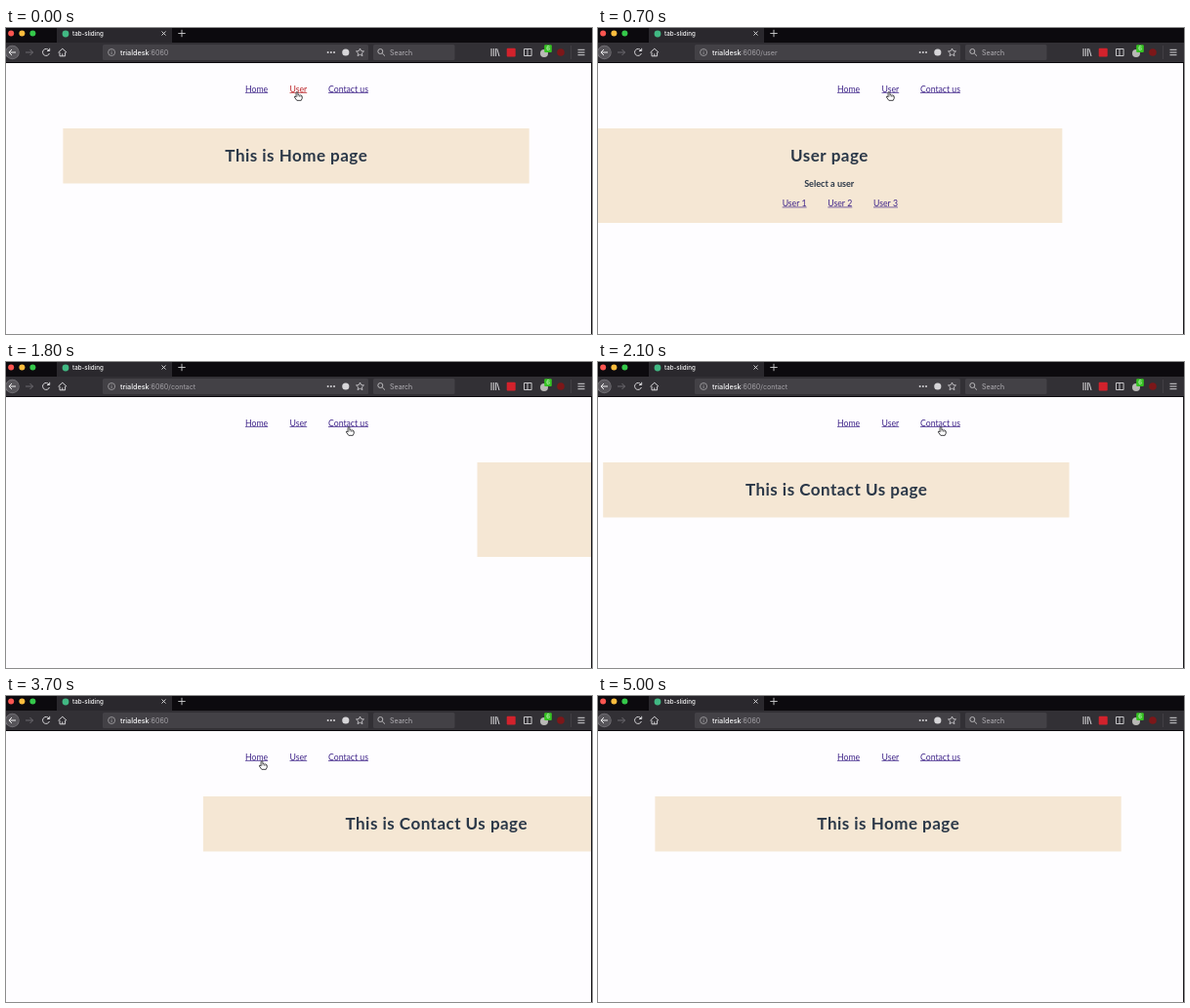
An HTML page with a canvas that plays this animation: 600x314 px, repeating every 5100 ms.

```html
<!DOCTYPE html>
<html lang="en">
<head>
<meta charset="utf-8">
<title>Page transitions</title>
<style>
html, body { margin: 0; width: 100%; height: 100%; overflow: hidden; background: #fefdff; }
canvas { display: block; width: 600px; height: 314px; }
</style>
</head>
<body>
<canvas id="stage"></canvas>
<script>
const W = 600, H = 314, LOOP = 5100, STEP = 100;
const SLIDE = 300, PANEL = { x: 58.4, y: 103, w: 477.3 };
const canvas = document.getElementById('stage');
const ctx = canvas.getContext('2d');
const dpr = window.devicePixelRatio || 1;
canvas.width = W * dpr;
canvas.height = H * dpr;

const LATO = 'Lato, "Open Sans", sans-serif';
const UI = 'Inter, Roboto, sans-serif';
const INK = '#2b3848', LINK = '#40268a', ACTIVE = '#bc262a', ICON = '#d6d5d8';
const DARK = '#0c0a0e', BAR = '#323035', FIELD = '#434146';

const pages = {
  home: { title: 'This is Home page', h: 56.5, path: '' },
  user: { title: 'User page', h: 97, path: '/user' },
  contact: { title: 'This is Contact Us page', h: 56.5, path: '/contact' }
};
const nav = [
  { text: 'Home', x: 245, w: 23 },
  { text: 'User', x: 290.5, w: 17.5 },
  { text: 'Contact us', x: 330, w: 41 }
];
// press: mouse down on the link, at: release and start of the slide
const clicks = [
  { press: 0, at: 225, link: 1, from: 'home', to: 'user' },
  { press: 1350, at: 1618.5, link: 2, from: 'user', to: 'contact' },
  { press: 3500, at: 3639.3, link: 0, from: 'contact', to: 'home' }
];
// time, x, y of the pointer tip
const pointer = [
  [0, 298, 65.5], [900, 298, 65.5], [1300, 351, 66.5], [2450, 351, 66.5],
  [2850, 266, 66.5], [3000, 266, 66.5], [3400, 262, 66.5], [3900, 262, 66.5],
  [4300, 311, 128], [4800, 468, -14], [5100, 468, -14]
];

function bezier(x1, y1, x2, y2) {
  const at = (a, b, s) => 3 * a * s * (1 - s) ** 2 + 3 * b * s * s * (1 - s) + s ** 3;
  return p => {
    let lo = 0, hi = 1;
    for (let i = 0; i < 24; i++) {
      const mid = (lo + hi) / 2;
      if (at(x1, x2, mid) < p) lo = mid; else hi = mid;
    }
    return at(y1, y2, lo);
  };
}
const ease = bezier(.25, .1, .25, 1);

function rect(x, y, w, h, fill, r = 0) {
  ctx.fillStyle = fill;
  ctx.beginPath();
  ctx.roundRect(x, y, w, h, r);
  ctx.fill();
}
function dot(x, y, r, fill) {
  ctx.fillStyle = fill;
  ctx.beginPath();
  ctx.arc(x, y, r, 0, 7);
  ctx.fill();
}
function stroke(d, color = ICON, width = 1) {
  ctx.strokeStyle = color;
  ctx.lineWidth = width;
  ctx.stroke(new Path2D(d));
}
function text(str, x, y, font, color, align = 'left') {
  ctx.font = font;
  ctx.fillStyle = color;
  ctx.textAlign = align;
  ctx.fillText(str, x, y);
  return ctx.measureText(str).width;
}
function link(str, x, y, color) {
  const w = text(str, x, y, '8.7px ' + LATO, color);
  rect(x, y + .6, w, .7, color);
}

function drawTabs() {
  rect(0, 0, W, 15, DARK);
  rect(52, 0, 118, 15, '#2a282d');
  dot(5.2, 5.5, 3, '#fc5550');
  dot(16.4, 5.5, 3, '#fdbd3e');
  dot(27.4, 5.5, 3, '#35c84a');
  dot(61, 6, 3.4, '#41b883');
  text('tab-sliding', 68, 8.2, '500 6.2px ' + UI, '#f4f4f5');
  stroke('M159.5 3.5l4 4m0-4l-4 4', '#e6e6e8', .9);
  stroke('M176.3 5.5h7.4M180 1.8v7.4', '#cfced1', .9);
}

function drawToolbar(path) {
  rect(0, 15, W, 20, BAR);
  rect(0, 35, W, 1, DARK);
  dot(6.5, 25, 7.2, '#77757a');
  dot(6.5, 25, 6.5, '#57555a');
  stroke('M10 25H3M6 22l-3 3 3 3', '#f0f0f1');
  stroke('M20 25h7.5m-3-3l3 3-3 3', '#6d6b70');
  stroke('M44 23a3.5 3.5 0 1 0 .4 3M44.7 20.8v2.7h-2.7');
  stroke('M53.5 25.2l4.3-4 4.3 4M55 25v3.8h5.6V25M57.8 28.8v-2.4');

  rect(99, 17, 272, 16, FIELD, 1.5);
  stroke('M104.6 25a3.5 3.5 0 1 0 7 0a3.5 3.5 0 1 0-7 0M108.1 24.5v2.4M108.1 22.8v.8', '#b6b5b8', .7);
  const host = text('trialdesk', 117, 27.5, '500 7.2px ' + UI, '#f6f6f7');
  text(':6060' + path, 117 + host, 27.5, '7.1px ' + UI, '#a5a3a8');
  for (let i = 0; i < 3; i++) dot(329.6 + i * 3.2, 25, 1, ICON);
  dot(347.8, 25, 3.6, ICON);
  const star = [];
  for (let i = 0; i < 10; i++) {
    const r = i % 2 ? 2 : 4.2, a = i * Math.PI / 5 - Math.PI / 2;
    star.push((362.5 + r * Math.cos(a)).toFixed(2) + ' ' + (25.2 + r * Math.sin(a)).toFixed(2));
  }
  stroke('M' + star.join('L') + 'Z', ICON, .8);

  rect(376, 17, 83.5, 16, FIELD, 1.5);
  stroke('M380.8 24a2.5 2.5 0 1 0 5 0a2.5 2.5 0 1 0-5 0M385.2 25.9l2.8 2.8', '#c3c2c5', .9);
  text('Search', 393, 27.5, '7px ' + UI, '#b4b2b7');

  stroke('M497 21v8M499.3 21v8M501.6 21v8M502.8 21.3l2.2 7.7');
  rect(512.7, 20.7, 9, 8.8, '#d2222c', 1);
  stroke('M530.5 21.5h7.6v7h-7.6ZM534 21.5v7', ICON, .9);
  dot(551, 26, 4, '#b9b8b6');
  rect(551.2, 17.2, 7.6, 7.8, '#35c322', 1);
  text('6', 555, 23.4, '6px ' + UI, '#e9f9e6', 'center');
  dot(568, 25, 3.8, '#7d1719');
  stroke('M578.5 18v14', '#4d4b50', .6);
  stroke('M585.5 22.3h7M585.5 25h7M585.5 27.7h7');
}

function drawPanel(name, dx) {
  const page = pages[name], mid = PANEL.x + PANEL.w / 2;
  ctx.save();
  ctx.beginPath();
  ctx.rect(0, 36, 599, H - 36);
  ctx.clip();
  ctx.translate(dx, 0);
  rect(PANEL.x, PANEL.y, PANEL.w, page.h, '#f5e7d4');
  ctx.letterSpacing = '0.48px';
  text(page.title, mid + .24, 136.8, 'bold 17px ' + LATO, INK, 'center');
  ctx.letterSpacing = '0px';
  if (name === 'user') {
    text('Select a user', mid, 163, 'bold 9.1px ' + LATO, INK, 'center');
    for (let i = 0; i < 3; i++) link('User ' + (i + 1), 249 + i * 46.7, 183, LINK);
  }
  ctx.restore();
}

const HAND = new Path2D('M-1 .8Q0-.6 1 .8V3.6Q2 2.8 2.8 3.9Q3.8 3.2 4.5 4.3Q5.6 4 5.7 5.2V7.2L4.6 9.6H-.2L-2.7 6.2Q-3.2 4.8-2 5L-1 5.9Z');
const ARROW = new Path2D('M0 0V9L2.1 7.1L3.5 10.3L5 9.6L3.6 6.5H6.5Z');

function drawPointer(t) {
  const i = pointer.findIndex(k => k[0] > t);
  const [t0, x0, y0] = pointer[i - 1], [t1, x1, y1] = pointer[i];
  const p = (t - t0) / (t1 - t0), s = p * p * (3 - 2 * p);
  const x = x0 + (x1 - x0) * s, y = y0 + (y1 - y0) * s;
  const over = y > 56 && y < 70 && nav.some(n => x >= n.x && x <= n.x + n.w);
  const shape = over ? HAND : ARROW;
  ctx.save();
  ctx.translate(x, y);
  ctx.scale(.92, .92);
  ctx.lineJoin = 'round';
  ctx.fillStyle = over ? '#fff' : '#111';
  ctx.strokeStyle = over ? '#1c1c20' : '#fff';
  ctx.lineWidth = .9;
  ctx.fill(shape);
  ctx.stroke(shape);
  if (over) stroke('M1 3.8V5.6M2.8 4.2V5.8M4.4 4.5V6', '#1c1c20', .5);
  ctx.restore();
}

function draw(t) {
  ctx.setTransform(dpr, 0, 0, dpr, 0, 0);
  rect(0, 0, W, H, '#fefdff');

  let current = 'home', shown = 'home', dx = 0, pressed = -1;
  for (const c of clicks) {
    if (t >= c.press && t < c.at) pressed = c.link;
    if (t < c.at) continue;
    const age = t - c.at;
    current = c.to;
    shown = age < SLIDE ? c.from : c.to;
    dx = age < SLIDE ? PANEL.w * ease(age / SLIDE)
      : PANEL.w * (ease(Math.min(1, age / SLIDE - 1)) - 1);
    if (age >= 2 * SLIDE) dx = 0;
  }

  nav.forEach((n, i) => link(n.text, n.x, 65.7, i === pressed ? ACTIVE : LINK));
  drawPanel(shown, dx);
  rect(599, 36, 1, H - 36, '#1c1a1e');
  drawTabs();
  drawToolbar(pages[current].path);
  drawPointer(t);
}

const start = performance.now();
function frame() {
  const t = (performance.now() - start) % LOOP;
  draw(Math.floor(t / STEP) * STEP);
  requestAnimationFrame(frame);
}
frame();
</script>
</body>
</html>
```
